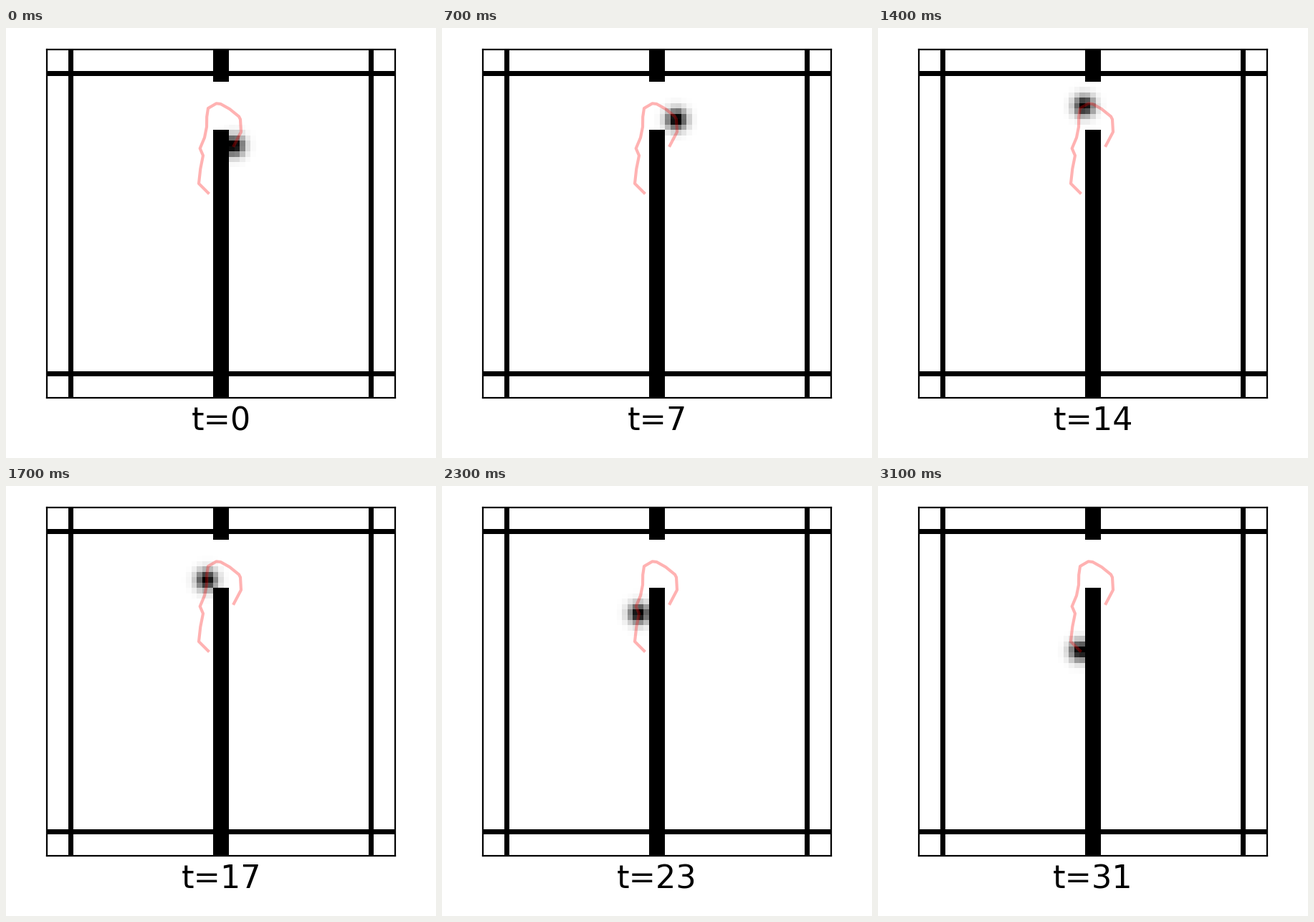
These frames come from a looping animation (600x600 px, 3.2 s). A matplotlib script:

```python
import numpy as np
import matplotlib.pyplot as plt
from matplotlib.animation import FuncAnimation

STAGE, DPI = 600, 200
LEFT, TOP, SIDE = 57, 30, 486      # plot box in stage pixels
GRID = 65                          # cells per side
SIGMA = 1.3                        # dot spread in cells
STEPS, STEP_MS = 32, 100

# Turning points of the walk: step -> stage position; straight in between
TURNS = {
    0: (318, 164), 4: (328, 145), 7: (327, 127.5), 8: (325, 123.5),
    10: (312, 113), 12: (299.5, 106), 13: (293.5, 105.3), 15: (282, 112),
    16: (280.2, 124), 18: (280, 138), 20: (277, 153), 22: (270.7, 168),
    23: (275, 178), 26: (271.3, 196.5), 28: (269, 217), 31: (282, 230),
}


def to_cell(pos, start):
    return (pos - start) * GRID / SIDE - 0.5


def make_walk():
    steps = np.arange(STEPS)
    xs, ys = zip(*TURNS.values())
    keys = list(TURNS)
    return (to_cell(np.interp(steps, keys, xs), LEFT),
            to_cell(np.interp(steps, keys, ys), TOP))


def make_walls():
    walls = np.zeros((GRID, GRID))
    for k in (4, GRID - 5):
        walls[k, :] = walls[:, k] = 1
    mid = slice(GRID // 2 - 1, GRID // 2 + 2)
    walls[:6, mid] = walls[15:, mid] = 1
    return walls


walk_x, walk_y = make_walk()
walls = make_walls()
rows, cols = np.mgrid[:GRID, :GRID]


def scene(step):
    dist2 = (cols - walk_x[step]) ** 2 + (rows - walk_y[step]) ** 2
    dot = np.exp(-dist2 / (2 * SIGMA ** 2))
    return np.maximum(walls, dot / dot.max())


fig = plt.figure(figsize=(STAGE / DPI, STAGE / DPI), dpi=DPI, facecolor="white")
ax = fig.add_axes([LEFT / STAGE, 1 - (TOP + SIDE) / STAGE,
                   SIDE / STAGE, SIDE / STAGE])
image = ax.imshow(scene(0), cmap="gray_r", vmin=0, vmax=1,
                  interpolation="nearest")
ax.plot(walk_x, walk_y, color="red", alpha=0.3, lw=1.5)
ax.set(xlim=(-0.5, GRID - 0.5), ylim=(GRID - 0.5, -0.5), xticks=[], yticks=[])
label = ax.set_xlabel("t=0", fontsize=16, family="DejaVu Sans")


def update(step):
    image.set_data(scene(step))
    label.set_text(f"t={step}")
    return image, label


anim = FuncAnimation(fig, update, frames=STEPS, interval=STEP_MS,
                     repeat=True, repeat_delay=0, blit=False)
plt.show()
```
